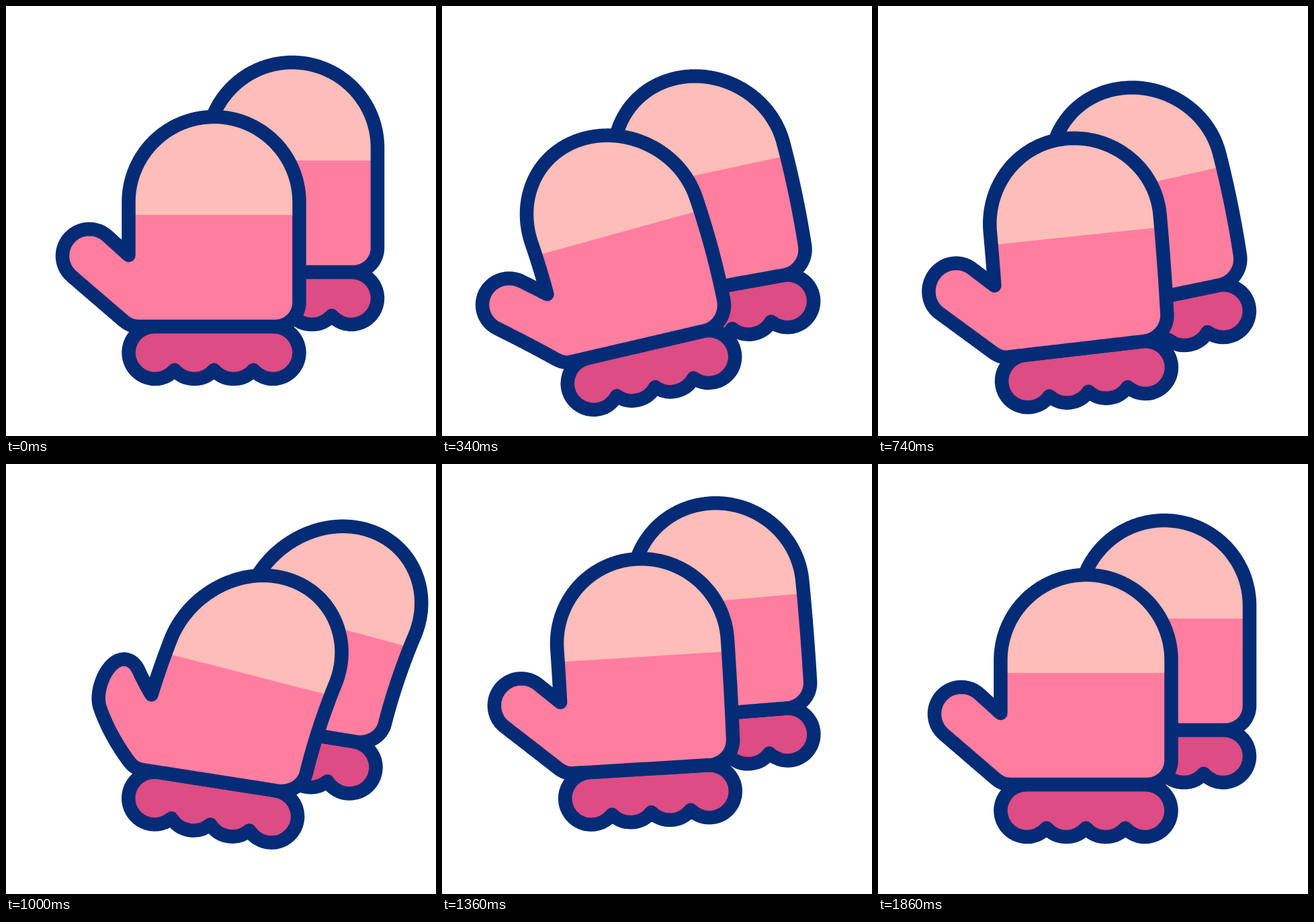
An HTML page that plays this animation: 640 by 640 pixels, repeating every 2400 ms.

```html
<!DOCTYPE html>
<html lang="en">
<head>
<meta charset="utf-8">
<title>Mittens</title>
<style>
  html, body { margin: 0; width: 100%; height: 100%; overflow: hidden; background: #fff; }
  svg { display: block; width: 100vw; height: 100vh; }
  .line { stroke: #042b76; stroke-width: 20.5; stroke-linejoin: round; }
  .cuff { fill: #dc4c85; }
  .body { fill: #ff7ea0; }
  .tip { fill: #fdbdb8; }
  .edge { fill: none; }
</style>
</head>
<body>
<svg viewBox="0 0 640 640"></svg>
<script>
const LOOP = 2400, LAG = 50;
const MID = 309.5, HALF = 127, CUFF_Y = 516, BASE_Y = 477, BAND_Y = 311;
const BAND_H = BASE_Y - BAND_Y, ARM = CUFF_Y - BASE_Y;
const RAD = Math.PI / 180;

const DOME = 'V292A127 127 0 0 1 436.5 292';
const TIP = `M182.5 311${DOME}V311Z`;
const THUMBED = `M182.5 371${DOME}V441A36 36 0 0 1 400.5 477H197` +
  'C185 477 179 472 172 466L98 402.4A40 40 0 0 1 150 341.6Z';
const PLAIN = `M182.5 441${DOME}V441A36 36 0 0 1 400.5 477H218.5A36 36 0 0 1 182.5 441Z`;
const CUFF = 'M221.5 477H397.5A39 39 0 1 1 368.17 541.7' +
  'A39 39 0 0 1 309.5 541.7A39 39 0 0 1 250.83 541.7A39 39 0 1 1 221.5 477Z';

// Turning points as [time, value]; angles in degrees
const TURNS = [20, 545, 965, 1290, 1530, 1820];
const atTurns = (...values) => values.map((v, i) => [TURNS[i], v]);
const CUFF_TURN = atTurns(0, -19.5, 9.3, -4.8, 2, 0);
const BODY_LEAN = atTurns(0, -20.5, 16.8, -4.2, 2.5, 0);
const DROP = [[30, 0], [570, 42], [1260, -26], [1760, 0]];

const svg = document.querySelector('svg');

function add(parent, tag, attrs) {
  const el = document.createElementNS('http://www.w3.org/2000/svg', tag);
  for (const k in attrs) el.setAttribute(k, attrs[k]);
  return parent.appendChild(el);
}

function sample(d) {
  const path = add(svg, 'path', { d });
  const len = path.getTotalLength(), n = Math.round(len / 4);
  const pts = Array.from({ length: n + 1 }, (_, i) => {
    const p = path.getPointAtLength(len * i / n);
    return [p.x, p.y];
  });
  path.remove();
  return pts;
}

// Half-cosine easing from one turning point to the next
function swing(turns, t) {
  const next = turns.findIndex(([time]) => time > t);
  if (next <= 0) return 0;
  const [t0, a] = turns[next - 1], [t1, b] = turns[next];
  return a + (b - a) * (1 - Math.cos(Math.PI * (t - t0) / (t1 - t0))) / 2;
}

function poseAt(t) {
  const turn = swing(CUFF_TURN, t);
  return { turn, lean: swing(BODY_LEAN, t), x: -.15 * turn, y: swing(DROP, t) };
}

// Bends a rest point along a curved spine that starts at the cuff
function bender({ turn, lean, x, y }) {
  const left = Math.max(0, -lean), right = Math.max(0, lean);
  const reach = BAND_H * (1 + .0022 * left);
  const dx = reach * Math.sin(lean * RAD), dy = -reach * Math.cos(lean * RAD);
  const baseX = MID + x + ARM * Math.sin(turn * RAD);
  const baseY = CUFF_Y + y - ARM * Math.cos(turn * RAD);
  const bandTurn = .575 * (turn + lean);
  return ([px, py]) => {
    const u = (BASE_Y - py) / BAND_H, curve = u * (u - 1);
    const angle = (turn + (bandTurn - turn) * u) * RAD;
    const thumb = Math.max(0, MID - HALF - px) / 108;
    const side = px - MID + 1.6 * right * thumb * thumb;
    return [
      baseX + dx * u + .85 * lean * curve + side * Math.cos(angle),
      baseY + dy * u + .3 * left * curve + side * Math.sin(angle)
    ];
  };
}

const outline = (pts, bend) =>
  'M' + pts.map(p => bend(p).map(v => v.toFixed(2)).join(' ')).join('L') + 'Z';

function mitten(shape, x, y, lag) {
  const g = add(svg, 'g', { transform: `translate(${x} ${y})` });
  const cuff = add(g, 'path', { class: 'cuff line', d: CUFF });
  const body = add(g, 'path', { class: 'body' });
  const tip = add(g, 'path', { class: 'tip' });
  const edge = add(g, 'path', { class: 'edge line' });
  const bodyPts = sample(shape), tipPts = sample(TIP);
  return t => {
    const pose = poseAt(t - lag), bend = bender(pose);
    cuff.setAttribute('transform',
      `translate(${pose.x} ${pose.y}) rotate(${pose.turn} ${MID} ${CUFF_Y})`);
    const d = outline(bodyPts, bend);
    body.setAttribute('d', d);
    edge.setAttribute('d', d);
    tip.setAttribute('d', outline(tipPts, bend));
  };
}

const mittens = [mitten(PLAIN, 116.5, -81, LAG), mitten(THUMBED, 0, 0, 0)];

function draw() {
  const t = performance.now() % LOOP;
  mittens.forEach(m => m(t));
  requestAnimationFrame(draw);
}
draw();
</script>
</body>
</html>
```
